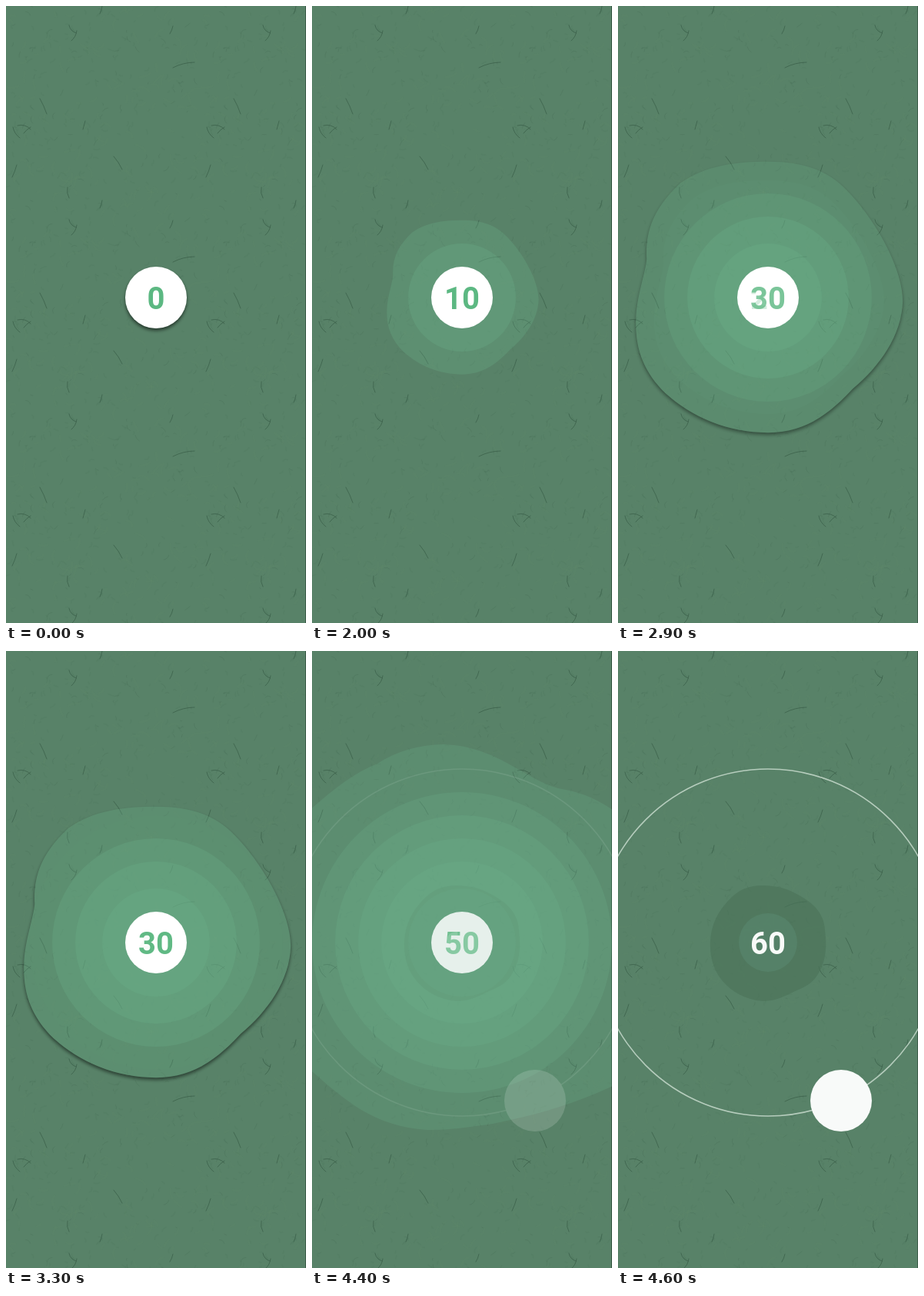
These frames come from a looping animation (390 by 800 pixels, 5.3 s). An HTML page with a canvas:

```html
<!DOCTYPE html>
<html lang="en">
<head>
<meta charset="utf-8">
<title>Growing counter</title>
<style>
html, body { margin: 0; width: 100%; height: 100%; overflow: hidden; background: #588268; }
canvas, svg { position: absolute; left: 0; top: 0; width: 390px; height: 800px; }

/* --p1 to --p6: how far each stage has faded in */
svg {
  --p1: 0; --p2: 0; --p3: 0; --p4: 0; --p5: 0; --p6: 0;
  animation: grow 5.3s step-end infinite;
}
@keyframes grow {
  32.07% { --p1: .2 }
  33.96% { --p1: .55 }
  35.84% { --p1: .85 }
  37.73% { --p1: 1 }
  41.50% { --p2: .2 }
  43.39% { --p2: .75 }
  45.28% { --p2: 1 }
  52.83% { --p3: .2 }
  54.71% { --p3: .75 }
  56.60% { --p3: 1 }
  62.26% { --p4: .03 }
  64.15% { --p4: .4 }
  66.03% { --p4: .8 }
  67.92% { --p4: 1 }
  73.58% { --p5: .2 }
  75.47% { --p5: .75 }
  77.35% { --p5: 1 }
  83.01% { --p6: .16 }
  84.90% { --p6: .72 }
  86.79% { --p6: 1 }
}
.s0 { --in: 1; --out: var(--p1) }
.s1 { --in: var(--p1); --out: var(--p2) }
.s2 { --in: var(--p2); --out: var(--p3) }
.s3 { --in: var(--p3); --out: var(--p4) }
.s4 { --in: var(--p4); --out: var(--p5) }
.s5 { --in: var(--p5); --out: var(--p6) }
.s6 { --in: var(--p6); --out: 0 }
.stage { opacity: calc(var(--in) * (1 - var(--out))) }
.keep { opacity: calc(var(--in) * (1 - var(--p6))) }
.glow { fill: #6cb48c; fill-opacity: .25 }
text { font: 700 40px Roboto, Arial, sans-serif; text-anchor: middle; fill: #5cb882 }
.s6 text { fill: #f8faf8 }
</style>
</head>
<body>
<canvas id="paper" width="390" height="800"></canvas>
<svg viewBox="0 0 390 800">
  <defs>
    <path id="blob" d="M0-152C40-152 67-142 88-120C120-88 151-33 151 4C150 42 125 77 95 102C67 132 40 151 0 151C-45 151-85 134-115 107C-140 82-149 57-148 24C-147-3-137-28-136-43C-138-78-125-103-98-128C-70-148-35-152 0-152Z"/>
    <filter id="shade" x="-20%" y="-20%" width="140%" height="140%">
      <feGaussianBlur stdDeviation="2"/>
      <feOffset dy="2.5"/>
      <feComposite operator="out" in2="SourceAlpha"/>
    </filter>
  </defs>

  <g class="s1 stage"><use href="#blob" class="glow" transform="translate(195 378) scale(.66)"/></g>
  <g class="s2 stage"><use href="#blob" class="glow" transform="translate(195 378)"/></g>
  <g class="s3 stage">
    <g filter="url(#shade)" opacity=".5"><use href="#blob" transform="translate(195 378) scale(1.16)"/></g>
    <use href="#blob" class="glow" transform="translate(195 378) scale(1.16)"/>
  </g>
  <g class="s4 stage"><use href="#blob" class="glow" transform="translate(195 378) scale(1.36)"/></g>
  <g class="s5 stage">
    <path class="glow" d="M-20 222C20 185 50 160 85 146C110 130 140 121 172 121C240 124 275 165 320 178C350 183 375 192 410 220C470 300 470 500 410 555C350 585 300 600 235 613C200 618 180 621 150 621C80 617 40 580 0 545C-60 480-60 270-20 222Z"/>
  </g>

  <g class="glow">
    <g class="s5"><circle class="keep" cx="195" cy="378" r="195"/></g>
    <g class="s4"><circle class="keep" cx="195" cy="378" r="165"/></g>
    <g class="s3"><circle class="keep" cx="195" cy="378" r="135"/></g>
    <g class="s2"><circle class="keep" cx="195" cy="378" r="105"/></g>
    <g class="s1"><circle class="keep" cx="195" cy="378" r="70"/></g>
  </g>

  <g class="s6 stage">
    <path fill="#4c735a" fill-opacity=".65" d="M188 304C208 304 222 309 236 317C256 328 268 342 269 362C272 385 270 405 258 422C250 434 238 437 224 444C212 450 202 454 188 454C165 452 148 442 136 428C124 414 119 396 120 376C121 355 130 338 143 324C156 310 168 304 188 304Z"/>
    <circle cx="195" cy="378" r="38" fill="#5c8c74" fill-opacity=".45"/>
    <circle cx="195" cy="378" r="225" fill="none" stroke="#d6e6da" stroke-opacity=".75" stroke-width="1.5"/>
    <circle cx="290" cy="583" r="40" fill="#f8faf9"/>
  </g>

  <g class="s0 stage"><circle cx="195" cy="378" r="40" filter="url(#shade)" fill-opacity=".55"/></g>
  <g class="s0"><circle class="keep" cx="195" cy="378" r="40" fill="#fff"/></g>

  <g class="s0 stage"><text x="195" y="392.5">0</text></g>
  <g class="s1 stage"><text x="195" y="392.5">10</text></g>
  <g class="s2 stage"><text x="195" y="392.5">20</text></g>
  <g class="s3 stage"><text x="195" y="392.5">30</text></g>
  <g class="s4 stage"><text x="195" y="392.5">40</text></g>
  <g class="s5 stage"><text x="195" y="392.5">50</text></g>
  <g class="s6 stage"><text x="195" y="392.5">60</text></g>
</svg>
<script>
const ctx = document.getElementById('paper').getContext('2d');
const TILE = 252;
let seed = 11;
const rnd = () => (seed = seed * 16807 % 2147483647) / 2147483647;

ctx.fillStyle = '#588268';
ctx.fillRect(0, 0, 390, 800);
ctx.lineCap = 'round';

// One curved fibre, repeated with the paper tile
function fibre(x, y, dx, dy, bend, color, width) {
  ctx.strokeStyle = color;
  ctx.lineWidth = width;
  for (let ox = -TILE; ox < 390; ox += TILE) {
    for (let oy = -TILE; oy < 800; oy += TILE) {
      const a = x + ox, b = y + oy;
      ctx.beginPath();
      ctx.moveTo(a, b);
      ctx.quadraticCurveTo(a + dx / 2 - dy * bend, b + dy / 2 + dx * bend, a + dx, b + dy);
      ctx.stroke();
    }
  }
}

function scatter(count, length, width, color) {
  for (let i = 0; i < count; i++) {
    const angle = rnd() * Math.PI * 2, len = length * (.3 + rnd());
    fibre(rnd() * TILE, rnd() * TILE, Math.cos(angle) * len, Math.sin(angle) * len,
      rnd() - .5, color, width);
  }
}

scatter(130, 12, 3, 'rgba(110,155,125,.05)');
scatter(160, 6, 1.5, 'rgba(55,95,70,.07)');
scatter(60, 7, .8, 'rgba(50,85,65,.2)');

// x, y, dx, dy, bend of the fibres that stand out
[
  [217, 80, 28, -7, -.12], [82, 25, 9, 10, .3], [92, 32, -7, 13, -.2],
  [44, 120, 9, 20, -.05], [8, 222, 6, -16, .05], [9, 157, 9, 14, .2],
  [15, 155, 17, 5, -.3], [32, 157, -9, 8, .1], [140, 195, 11, 17, -.08],
  [103, 149, -3, 11, 0], [122, 10, 3, -10, .1], [213, 36, 4, -10, .1],
  [80, 235, 2, 14, .2]
].forEach(f => fibre(...f, 'rgba(45,78,58,.5)', 1));

ctx.fillStyle = '#3c5b48';
ctx.fillRect(389, 0, 1, 800);
</script>
</body>
</html>
```
